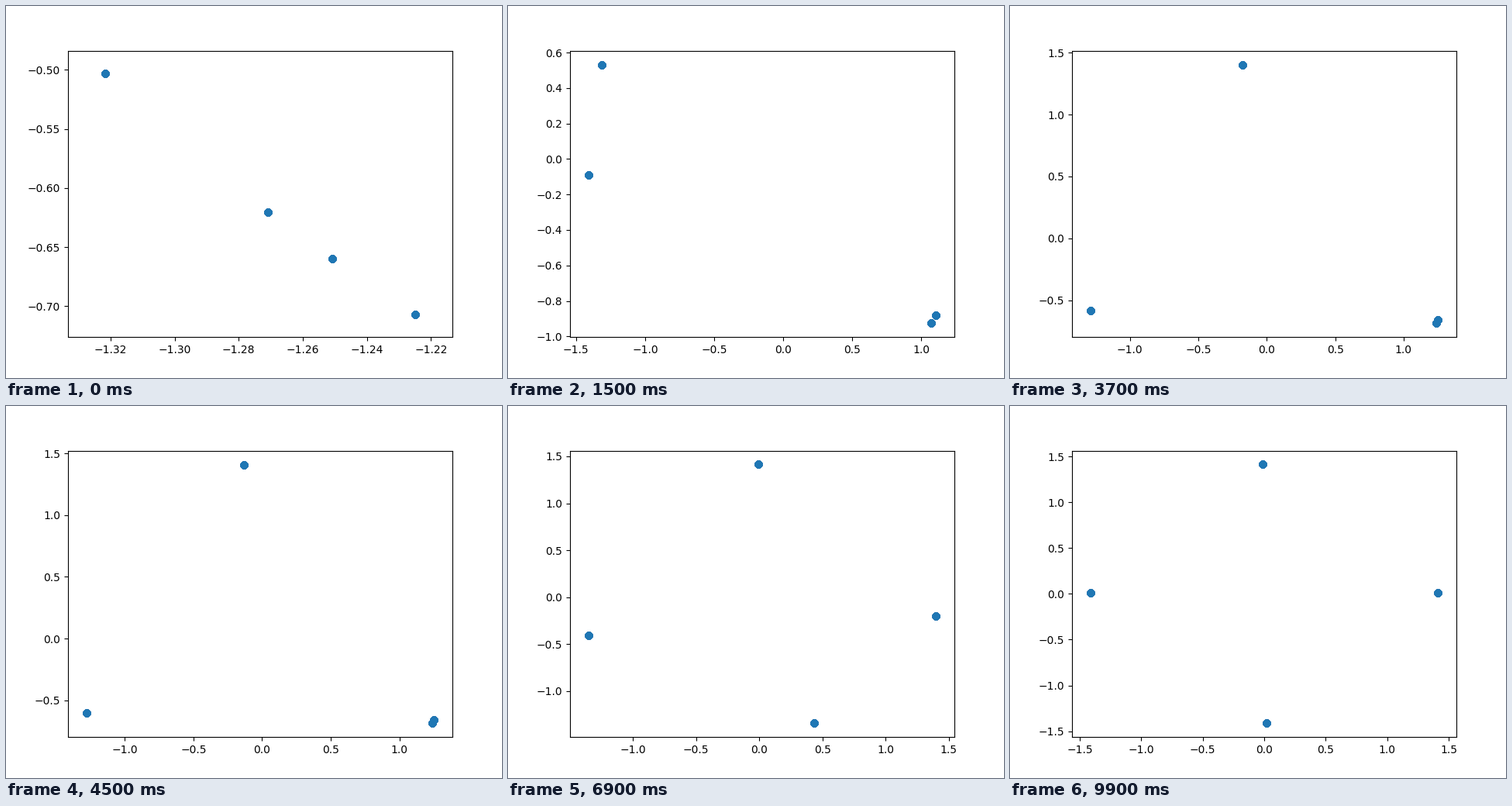
A matplotlib script that plays this animation: 640 px wide and 480 px high, repeating every 10000 ms.

```python
import numpy as np
import matplotlib.pyplot as plt
from matplotlib.animation import FuncAnimation

FRAMES, INTERVAL = 100, 100
RADIUS = np.sqrt(2)
LAYERS = 100             # stacked markers give the hard edge
PAD = (3 / 496, 3 / 369.6)
MARGIN = 0.05


def ease(t, start, end):
    u = np.clip((t - start) / (end - start), 0, 1)
    return u * u * (3 - 2 * u)


def angles(t):
    """Four points on a circle, in degrees: a pair swings away, then splits."""
    swing = 111.48 * ease(t, 0, 15)
    split = ease(t, 52, 59)
    top = 200.83 - 101.9 * ease(t, 3.7, 29) - 3.5 * ease(t, 29, 45) - 5 * split
    left = (206.02 - 22.4 * ease(t, 0, 15) + 21.55 * ease(t, 15, 40)
            - 25.5 * ease(t, 54, 93))
    bottom = (207.81 + swing + 11.8 * ease(t, 15, 35)
              - 34.9 * split - 25.3 * ease(t, 59, 85))
    right = (209.995 + swing + 10.8 * ease(t, 15, 29)
             + 18 * split + 10.1 * ease(t, 59, 99))
    return np.radians([top, left, bottom, right])


def limits(values, pad):
    lo, hi = values.min() - pad, values.max() + pad
    extra = MARGIN * (hi - lo)
    return lo - extra, hi + extra


fig, ax = plt.subplots(figsize=(6.4, 4.8), dpi=100)
dots = ax.scatter(np.zeros(4 * LAYERS), np.zeros(4 * LAYERS), color="#1f77b4")


def update(frame):
    a = angles(frame)
    x, y = RADIUS * np.cos(a), RADIUS * np.sin(a)
    dots.set_offsets(np.tile(np.column_stack([x, y]), (LAYERS, 1)))
    ax.set_xlim(*limits(x, PAD[0]))
    ax.set_ylim(*limits(y, PAD[1]))
    return [dots]


anim = FuncAnimation(fig, update, frames=FRAMES, interval=INTERVAL,
                     repeat=True, repeat_delay=0, blit=False)
plt.show()
```
